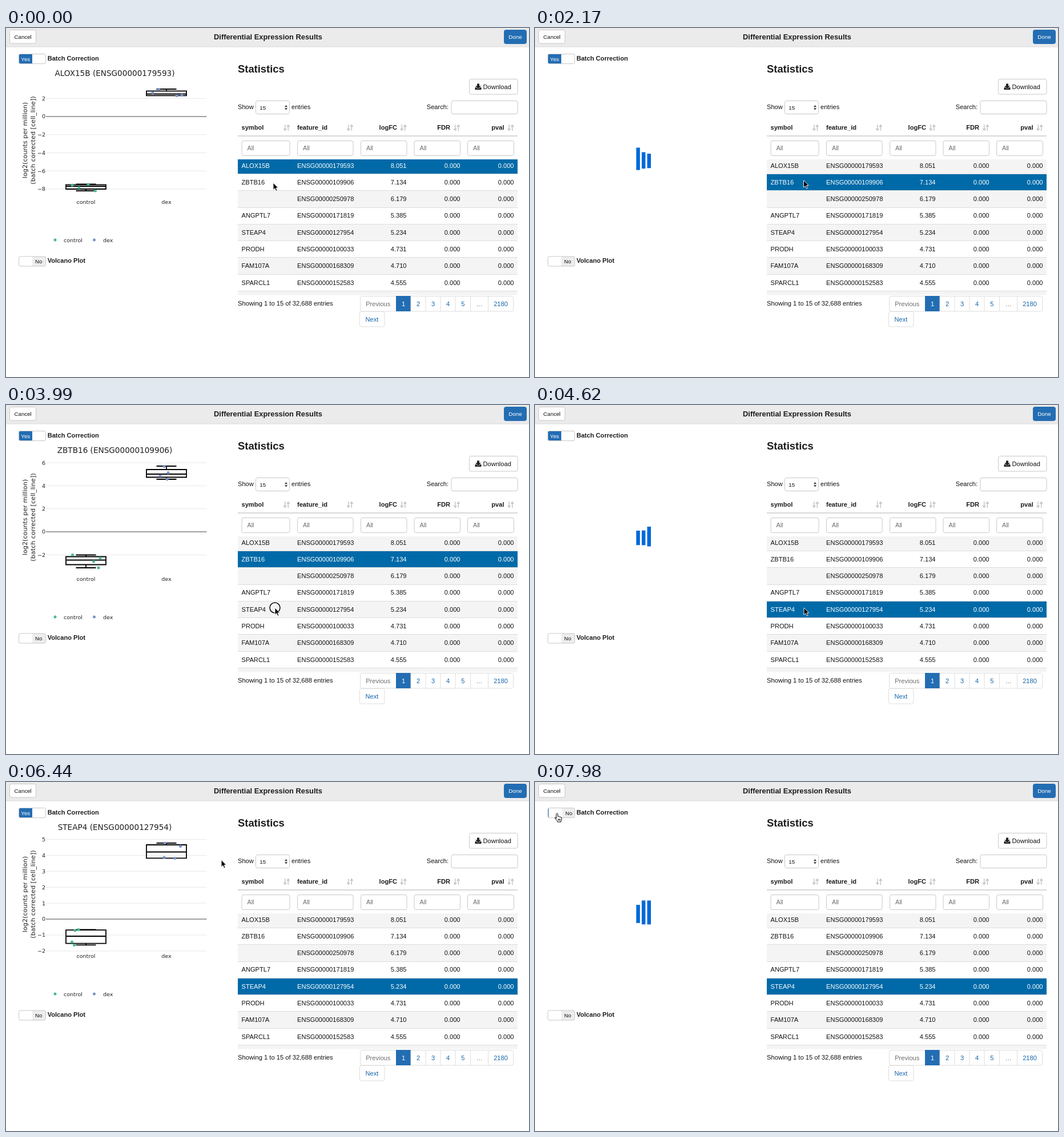
These frames come from a looping animation (916x611 px, 8000 ms). An HTML page:

```html
<!DOCTYPE html>
<html lang="en">
<head>
<meta charset="utf-8">
<title>Differential Expression Results</title>
<style>
  html, body { margin: 0; width: 100%; height: 100%; overflow: hidden; background: #fff; }
  svg { display: block; width: 916px; height: 611px; font: 11.1px "Liberation Sans", Arial, sans-serif; fill: #111; }
  .b { font-weight: bold; fill: #1c1c1c; }
  .m { text-anchor: middle; }
  .e { text-anchor: end; }
  .w { fill: #fff; }
  .link { fill: #1464aa; }
  .mute { fill: #6c6c6c; }
  .plot { font-family: "DejaVu Sans", Verdana, sans-serif; font-size: 9.5px; fill: #222; }
</style>
</head>
<body>
<svg id="stage" viewBox="0 0 916 611"></svg>
<script>
const BLUE = '#236db3', SELECTED = '#006aa8', GREEN = '#49b993', PURPLE = '#7a92cb';
const $ = id => document.getElementById(id);

// Drawing helpers that return SVG markup
const text = (x, y, s, cls = '', size = '') =>
  `<text x="${x}" y="${y}" class="${cls}"${size && ` style="font-size:${size}px"`}>${s}</text>`;
const rect = (x, y, w, h, fill, extra = '') =>
  `<rect x="${x}" y="${y}" width="${w}" height="${h}" fill="${fill}" ${extra}/>`;
const field = (x, y, w, h, fill = '#fff', stroke = '#c8c8c8') =>
  rect(x, y, w, h, fill, `rx="3" stroke="${stroke}"`);
const path = (d, extra) => `<path d="${d}" ${extra}/>`;
const dot = (x, y, fill) => `<circle cx="${x}" cy="${y}" r="2.5" fill="${fill}"/>`;

// Table
const genes = [
  ['ALOX15B', '179593', '8.051'], ['ZBTB16', '109906', '7.134'], ['', '250978', '6.179'],
  ['ANGPTL7', '171819', '5.385'], ['STEAP4', '127954', '5.234'], ['PRODH', '100033', '4.731'],
  ['FAM107A', '168309', '4.710'], ['SPARCL1', '152583', '4.555']
];
const rowTop = i => i ? Math.round(254.9 + 29.3 * (i - 1)) : 229;
const rowFill = i => i % 2 ? '#fff' : '#f4f4f4';
const featureId = i => 'ENSG00000' + genes[i][1];

function tableRow([symbol, , fold], i) {
  const y = rowTop(i), base = 244.5 + 29.3 * i;
  return rect(406, y + 1, 490, rowTop(i + 1) - y - 1, rowFill(i), `id="bg${i}"`) +
    rect(406, rowTop(i + 1), 490, 1, '#ddd') +
    `<g id="row${i}">` + text(412.5, base, symbol) + text(510, base, featureId(i)) +
    text(701.5, base, fold, 'e') + text(795.5, base, '0.000', 'e') + text(889.5, base, '0.000', 'e') + '</g>';
}

function sortIcon(x) {
  return path(`M${x - 2.8} 169v10m-2.4-3 2.4 3.2 2.4-3.2M${x + 2.8} 180v-10m-2.4 3 2.4-3.2 2.4 3.2`,
    'fill="none" stroke="#c6c6c6" stroke-width="1.5"');
}

function table() {
  const heads = text(412.5, 178, 'symbol', 'b') + text(510, 178, 'feature_id', 'b') +
    text(685, 178, 'logFC', 'b e') + text(778, 178, 'FDR', 'b e') + text(872.5, 178, 'pval', 'b e');
  const filters = [[413, 84], [510.5, 97.5], [621.5, 80.5], [715, 80.5], [808.5, 81]]
    .map(([x, w]) => field(x, 197.5, w, 26) + text(x + 9.5, 214.3, 'All', 'mute', 10.8)).join('');
  return heads + [491.5, 602.5, 696, 789.5, 884].map(sortIcon).join('') +
    rect(406, 188, 490, 2, '#d8d8d8') + filters + genes.map(tableRow).join('') +
    rect(406, rowTop(8) + 1, 490, 6.5, '#f4f4f4');
}

function pager() {
  const edges = [620.5, 683, 709, 735, 761, 787, 813.5, 844.5, 888.5];
  const labels = ['Previous', 1, 2, 3, 4, 5, '…', 2180];
  return field(620.5, 469.5, 268, 26.5, '#fff', '#ddd') +
    labels.map((label, i) => {
      const x = edges[i], w = edges[i + 1] - x, on = label === 1;
      return (on ? rect(x, 469, w, 27, BLUE) : i ? rect(x - .5, 469.5, 1, 26.5, '#ddd') : '') +
        text(x + w / 2, 486.6, label, 'm ' + (on ? 'w' : label > 0 ? 'link' : 'mute'));
    }).join('') +
    field(619.5, 496.5, 43.5, 26.5, '#fff', '#ddd') + text(641, 513.6, 'Next', 'm link');
}

// A switch whose strip [Yes | handle | No] slides inside a rounded frame
function toggle(id, y, shift) {
  return `<clipPath id="${id}Clip"><rect x="22.5" y="${y}" width="47" height="17" rx="2.5"/></clipPath>
    <g clip-path="url(#${id}Clip)"><g id="${id}" transform="translate(${shift})">` +
    rect(22, y, 24, 17, BLUE) + rect(70, y, 25, 17, '#ededed') +
    text(34.2, y + 12, 'Yes', 'm w', 9.6) + text(81.2, y + 12, 'No', 'm', 9.6) + '</g></g>' +
    rect(22.5, y, 47, 17, 'none', 'rx="2.5" stroke="#c8c8c8"');
}

// Box plots
const plots = [
  { gene: 0, zero: 155, unit: 15.85, ticks: [2, 0, -2, -4, -6, -8],
    control: [273.5, 274.3, 277, 282, 285], dex: [107, 110.3, 115.5, 118.3, 118.3],
    dots: [[116, 275], [144, 274], [128, 279.5], [156.5, 285], [267.5, 107.5], [257, 113.5], [299, 118.5], [308, 117.5]] },
  { gene: 1, zero: 222, unit: 20.15, ticks: [6, 4, 2, 0, -2],
    control: [262.5, 265.5, 271.5, 279.5, 285], dex: [107, 113, 121, 126.5, 130],
    dots: [[116.5, 262.5], [165, 268], [153.5, 274], [162, 285], [277, 107.5], [284, 118.5], [270, 124], [282, 130]] },
  { gene: 4, zero: 240, unit: 27.9, ticks: [5, 4, 3, 2, 1, 0, -1, -2],
    control: [258.5, 259.2, 270, 282.7, 285.3], dex: [107, 110, 122.5, 133.3, 133.3],
    dots: [[121, 260], [127, 258.5], [115.5, 280], [119.5, 285.5], [278.5, 107], [305.5, 112.5], [277, 132], [295.5, 133.5]] }
];

const box = (x, [top, q3, mid, q1, low]) =>
  path(`M${x - 35} ${q3}h70V${q1}h-70zM${x - 35} ${mid}h70M${x - 17.5} ${top}h35M${x} ${top}V${q3}` +
    `M${x - 17.5} ${low}h35M${x} ${low}V${q1}`, 'fill="none" stroke="#000" stroke-width="1.8"');

function plot({ gene, zero, unit, ticks, control, dex, dots }, i) {
  const grid = ticks.map(v => {
    const y = zero - v * unit;
    return rect(70, y - .5, 281.5, 1, v ? '#e9e9e9' : '#444') +
      text(69, y + 3.4, String(v).replace('-', '−'), 'e');
  }).join('');
  return `<g id="plot${i}" class="plot">` + grid +
    text(190.5, 84, `${genes[gene][0]} (${featureId(gene)})`, 'm', 13.6) +
    `<g transform="translate(37 196.5) rotate(-90)">` + text(0, 0, 'log2(counts per million)', 'm', 11.2) +
    text(0, 13.5, '(batch corrected [cell_line])', 'm', 11.2) + '</g>' +
    box(140, control) + box(281, dex) +
    dots.map(([x, y], k) => dot(x, y, k < 4 ? GREEN : PURPLE)).join('') +
    text(140, 308.3, 'control', 'm') + text(281, 308.3, 'dex', 'm') +
    dot(86, 371, GREEN) + dot(154.5, 371, PURPLE) + text(101, 374.6, 'control') + text(170, 374.6, 'dex') + '</g>';
}

$('stage').innerHTML =
  rect(0, 0, 916, 33, '#ebebeb') + rect(0, 32.5, 916, 1, '#dcdcdc') +
  field(6.5, 3.5, 46, 23.5) + text(29.7, 19, 'Cancel', 'm', 9.7) +
  text(459, 19.7, 'Differential Expression Results', 'b m', 12.85) +
  field(872.5, 3.5, 39, 24, BLUE, BLUE) + text(892, 19, 'Done', 'm w', 9.8) +
  toggle('batch', 45.5, 0) + text(72.7, 57, 'Batch Correction', 'b') +
  toggle('volcano', 400, -24) + text(72.7, 411, 'Volcano Plot', 'b') +
  text(406, 78, 'Statistics', 'b', 18.4) +
  field(811.5, 89.5, 84.5, 26.5) + text(835.5, 106.8, 'Download') +
  path('M825 97.5h4v4h3l-5 5-5-5h3zM821.5 104h2.2l2 2.2h2.6l2-2.2h2.2v4h-11z', 'fill="#222"') +
  text(406, 142.3, 'Show') + field(437.5, 127.5, 59, 23) + text(444.3, 143, '15', '', 9.9) +
  path('M488 138.2h5l-2.5-3.2zM488 140.2h5l-2.5 3.2z', 'fill="#333"') + text(500, 142.3, 'entries') +
  text(775, 142.3, 'Search:', 'e') + field(780, 127.5, 116, 23) +
  table() + text(406, 486, 'Showing 1 to 15 of 32,688 entries', '', 11.2) + pager() +
  plots.map(plot).join('') +
  '<g id="loader">' + [177.3, 186.9, 196.5].map(x => rect(x, 0, 6.5, 0, '#0069d9')).join('') + '</g>' +
  '<g id="ring" fill="none"><circle stroke="#fff" stroke-width="3.4"/><circle stroke="#000" stroke-width="1.5"/></g>' +
  '<g id="pointer">' +
  path('M0 0V12.3L2.9 9.7L4.9 14.3L7 13.4L5 8.9H8.7Z', 'id="arrow" fill="#000" stroke="#fff" stroke-width=".9"') +
  path('M.6 9V1.2Q.6-.6 2-.6Q3.4-.6 3.4 1.2V5Q5.3 3.8 6 5.5Q7.7 4.6 8.3 6.3Q10 5.6 10 7.6V10Q9.8 12 8.7 13.5V14.5' +
    'H2.8V13.3Q1 11.2-.9 8.8Q-2.2 6.8-.8 6.4Q0 6.2.6 7.5M4.1 9V12M5.8 9V12M7.5 9V12',
    'id="hand" fill="#fff" stroke="#000" stroke-width="1"') + '</g>';

// Timeline: pointer keys are [ms, x, y]; visits give the loading span after each click
const route = [
  [70, 468, 271], [560, 469.5, 268], [770, 470.5, 266.7], [2870, 470.5, 266.7], [3150, 462.5, 298],
  [3640, 471, 355], [5740, 471, 355], [5810, 464.7, 355], [6200, 432, 240], [6580, 345, 76],
  [6720, 130, 62], [6860, 37, 54.5], [7070, 36.6, 55.5]
];
const visits = [
  { click: 1120, from: 1260, to: 2380 },
  { click: 3990, from: 4060, to: 5180 },
  { click: 7560, from: 7700, to: 8000 }
];
const clamp = v => Math.max(0, Math.min(1, v));
const smooth = v => v * v * (3 - 2 * v);
const show = (id, on) => $(id).style.display = on ? '' : 'none';

function pointerAt(t) {
  const i = route.findIndex(k => k[0] > t);
  if (i < 0) return route.at(-1).slice(1);
  if (!i) return route[0].slice(1);
  const [t0, x0, y0] = route[i - 1], [t1, x1, y1] = route[i], k = (t - t0) / (t1 - t0);
  return [x0 + (x1 - x0) * k, y0 + (y1 - y0) * k];
}

// Each bar stretches for the first 400 ms of a second, shrinks for 400 and rests
function drawLoader(time) {
  [...$('loader').children].forEach((bar, i) => {
    const p = (time + 320 - 160 * i) % 1000;
    const k = smooth(p < 400 ? p / 400 : clamp((800 - p) / 400));
    bar.setAttribute('y', 220 - 14 * k);
    bar.setAttribute('height', 25.3 + 18.5 * k);
  });
}

function draw(t) {
  const [x, y] = pointerAt(t);
  $('pointer').setAttribute('transform', `translate(${x} ${y})`);
  show('arrow', t < 7070);
  show('hand', t >= 7070);

  const selected = t < 1190 ? 0 : t < 4060 ? 1 : 4;
  genes.forEach((_, i) => {
    $('bg' + i).setAttribute('fill', i === selected ? SELECTED : rowFill(i));
    $('row' + i).setAttribute('class', i === selected ? 'w' : '');
  });

  const loading = visits.find(v => t >= v.from && t < v.to);
  const current = visits.slice(0, 2).filter(v => t >= v.from).length;
  plots.forEach((_, i) => show('plot' + i, !loading && i === current));
  show('loader', loading);
  if (loading) drawLoader(t - loading.from + 40);

  const click = visits.find(v => t >= v.click && t < v.click + 280);
  show('ring', click);
  if (click) {
    const age = t - click.click;
    $('ring').setAttribute('transform', `translate(${x} ${y})`);
    $('ring').setAttribute('opacity', clamp(1.4 - age / 200));
    for (const c of $('ring').children) c.setAttribute('r', 9 + Math.min(16, age * .11));
  }

  const slide = 1 - (1 - clamp((t - 7630) / 500)) ** 2.1;
  $('batch').setAttribute('transform', `translate(${-24 * slide})`);
}

// The picture advances in steps of 70 ms
const start = performance.now();
function tick() {
  const t = (performance.now() - start) % 8000;
  draw(Math.floor(t / 70) * 70);
  requestAnimationFrame(tick);
}
tick();
</script>
</body>
</html>
```
